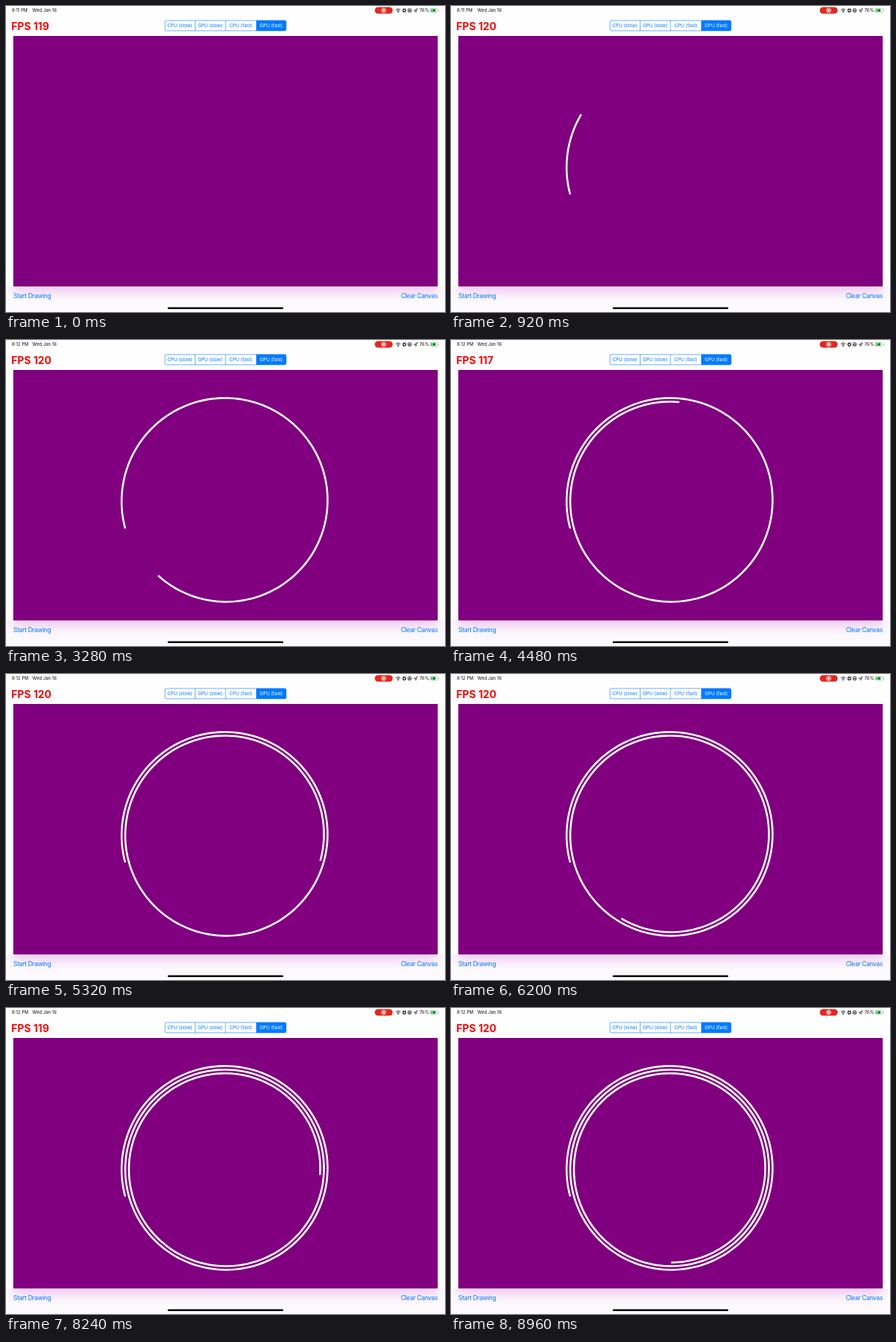
An HTML page that plays this animation: 600 px wide and 419 px high, repeating every 9000 ms.

```html
<!DOCTYPE html>
<html lang="en">
<head>
<meta charset="utf-8">
<title>Spiral drawing</title>
<style>
  html, body { margin: 0; width: 100%; height: 100%; overflow: hidden; background: #fefefe; }
  svg { display: block; width: 100%; height: 100%; font-family: Inter, Roboto, sans-serif; }
  .status { font-size: 6.1px; fill: #111; }
  .segments { font-size: 6.53px; letter-spacing: -.01em; text-anchor: middle; fill: #007aff; }
  .button { font-size: 8.54px; letter-spacing: -.033em; fill: #007aff; }
  .icon { fill: none; stroke: #111; stroke-width: .8; }
</style>
</head>
<body>
<svg viewBox="0 0 600 419">
  <defs>
    <filter id="blur" x="-10%" y="-60%" width="120%" height="220%"><feGaussianBlur stdDeviation="8"/></filter>
    <clipPath id="bar"><rect y="384" width="600" height="35"/></clipPath>
  </defs>

  <g class="status">
    <text id="clock" x="8" y="8.2"></text>
    <text x="36" y="8.2">Wed Jan 16</text>
    <text x="565" y="8.2">76%</text>
  </g>
  <rect x="504" y="1.5" width="24.5" height="9" rx="4.5" fill="#e3271f"/>
  <circle cx="516.2" cy="6" r="3" fill="none" stroke="#fff" stroke-width=".8"/>
  <circle cx="516.2" cy="6" r="1.7" fill="#fff"/>

  <g class="icon">
    <path d="M532.8 5.2Q536 2.4 539.2 5.2M534 6.6Q536 4.9 538 6.6"/>
    <circle cx="536" cy="8" r=".5" fill="#111"/>
    <circle cx="544.5" cy="6.2" r="1.9" stroke-width="1.2"/>
    <path d="M542.2 4.2l1-1M546.8 4.2l-1-1"/>
    <circle cx="551.7" cy="6" r="2.6" stroke-width=".7"/>
    <path d="M550.5 6h2.4v1.2h-2.4zM551 6v-1h1.4v1" stroke-width=".6"/>
    <path d="M557.6 6.2l4.8-2.6-2.3 5-.3-2.4z" stroke-width=".7"/>
    <rect x="579.7" y="3.4" width="10.6" height="5.2" rx="1.4" stroke="#999" stroke-width=".5"/>
    <path d="M591.4 5.2v1.6" stroke="#999"/>
  </g>
  <rect x="580.4" y="4.1" width="7.2" height="3.8" rx=".7" fill="#4cd964"/>
  <path d="M585.9 3.4l-2.3 3h1.3l-.5 2.2 2.3-3h-1.3z" fill="#222"/>

  <text id="fps" x="7.3" y="33" font-size="14.2" font-weight="700" fill="#f20a0a"></text>

  <rect x="217.3" y="19.9" width="165.6" height="14" rx="2" fill="#fff" stroke="#007aff" stroke-width=".6"/>
  <path d="M342 19.7h39a2 2 0 0 1 2 2v10.4a2 2 0 0 1-2 2h-39z" fill="#007aff"/>
  <path d="M258.5 20v14M300 20v14" stroke="#007aff" stroke-width=".6"/>
  <g class="segments">
    <text x="237.6" y="29.2">CPU (slow)</text>
    <text x="279.2" y="29.2">GPU (slow)</text>
    <text x="320.9" y="29.2">CPU (fast)</text>
    <text x="362.5" y="29.2" fill="#fff">GPU (fast)</text>
  </g>

  <rect x="10" y="41" width="580" height="343" fill="#800080"/>
  <path id="stroke" fill="none" stroke="#fff" stroke-width="2.6" stroke-linecap="round" stroke-linejoin="round"/>

  <g clip-path="url(#bar)">
    <rect y="384" width="600" height="35" fill="#fcfafd"/>
    <rect x="10" y="340" width="580" height="52" fill="#f0c8f0" filter="url(#blur)"/>
  </g>
  <text class="button" x="10" y="399.5">Start Drawing</text>
  <text class="button" x="590" y="399.5" text-anchor="end">Clear Canvas</text>
  <rect x="221" y="412.5" width="158" height="2.6" rx="1.3" fill="#000"/>
</svg>
<script>
const LOOP = 9000, STEP = 40;
const START = 165, SPEED = 0.1193, DELAY = 543; // degrees, degrees per ms, ms
const RATES = [119, 120, 119, 116, 118, 120, 120, 119, 117, 119, 120, 118, 120, 119, 120, 120, 119, 120];
const get = id => document.getElementById(id);
const clock = get('clock'), fps = get('fps'), stroke = get('stroke');

function point(deg) {
  const a = deg * Math.PI / 180;
  const r = 142 - 5 * (deg - 180) / 360;
  return (300 + r * Math.cos(a)).toFixed(2) + ' ' + (220.2 + r * Math.sin(a)).toFixed(2);
}

function spiral(end) {
  if (end <= START) return '';
  const points = [];
  for (let d = START; d < end; d += 2) points.push(point(d));
  points.push(point(end));
  return 'M' + points.join('L');
}

function draw(now) {
  const t = Math.floor(now % LOOP / STEP) * STEP;
  clock.textContent = t < 2400 ? '8:11 PM' : '8:12 PM';
  fps.textContent = 'FPS ' + RATES[Math.floor(t / 500)];
  stroke.setAttribute('d', spiral(START + SPEED * (t - DELAY)));
}

const begin = performance.now();
function tick() {
  draw(performance.now() - begin);
  requestAnimationFrame(tick);
}
tick();
</script>
</body>
</html>
```
